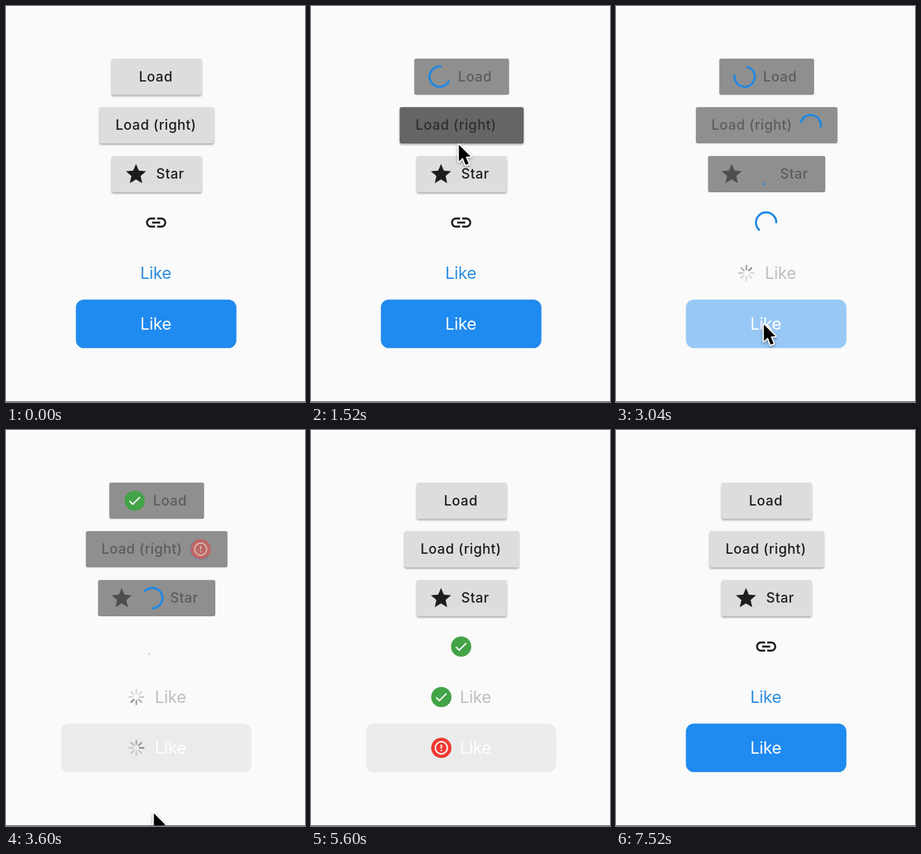
Write an HTML page with a canvas that moves like this. It is 460 px wide and 608 px high and loops after 7.56 s.

```html
<!DOCTYPE html>
<html lang="en">
<head>
<meta charset="utf-8">
<title>Progress buttons</title>
<style>
  html, body { margin: 0; width: 460px; height: 608px; overflow: hidden; background: #fafafa; }
  canvas { display: block; }
</style>
</head>
<body>
<canvas id="stage" width="460" height="608"></canvas>
<script>
const ctx = document.getElementById('stage').getContext('2d');
const LOOP = 7560, STEP = 40;
const DONE = 2060, REVERT = 3960; // ms after a click
const MID = 231.5, TAU = Math.PI * 2;
const BLUE = [31, 138, 240], SPIN_BLUE = '#1e88e5';

const ICON_SCALE = 1.55;
const STAR = new Path2D('M12 17.27L18.18 21l-1.64-7.03L22 9.24l-7.19-.61L12 2 9.19 8.63 2 9.24l5.46 4.73L5.82 21z');
const LINK = new Path2D('M3.9 12c0-1.71 1.39-3.1 3.1-3.1h4V7H7c-2.76 0-5 2.24-5 5s2.24 5 5 5h4v-1.9H7c-1.71 0-3.1-1.39-3.1-3.1zM8 13h8v-2H8v2zm9-6h-4v1.9h4c1.71 0 3.1 1.39 3.1 3.1s-1.39 3.1-3.1 3.1h-4V17h4c2.76 0 5-2.24 5-5s-2.24-5-5-5z');
const ARROW = new Path2D('M0 0V25.5L6 20L10.5 31L15 29L10.5 18.5L18 18Z');

const CURSOR_Y = [[400, -36], [760, 88], [1000, 137], [1520, 212], [2280, 356], [3040, 488], [3200, 490], [3700, 612]];

const lerp = (a, b, p) => a + (b - a) * p;
const clamp = v => Math.max(0, Math.min(1, v));
const rgb = c => `rgb(${c.map(Math.round).join(',')})`;
const mix = (a, b, p) => a.map((v, i) => lerp(v, b[i], p));
const grey = v => rgb([v, v, v]);

// Linear interpolation through [time, value] keys
function track(t, keys) {
  if (t <= keys[0][0]) return keys[0][1];
  for (let i = 1; i < keys.length; i++) {
    const [t0, v0] = keys[i - 1], [t1, v1] = keys[i];
    if (t < t1) return lerp(v0, v1, (t - t0) / (t1 - t0));
  }
  return keys[keys.length - 1][1];
}

// cubic-bezier(.4, 0, .2, 1)
function ease(x) {
  x = clamp(x);
  let lo = 0, hi = 1;
  for (let i = 0; i < 20; i++) {
    const u = (lo + hi) / 2, v = 1 - u;
    if (1.2 * v * v * u + 0.6 * v * u * u + u * u * u < x) lo = u; else hi = u;
  }
  return 3 * lo * lo - 2 * lo * lo * lo;
}

const expand = (t, end) => track(t, [[30, 0], [230, 1], [end, 1], [end + 200, 0]]);
const spinAlpha = t => track(t, [[150, 0], [300, 1], [DONE, 1], [DONE + 150, 0]]);
const statusAlpha = t => track(t, [[DONE + 50, 0], [DONE + 200, 1], [REVERT, 1], [REVERT + 120, 0]]);

function faded(alpha, draw) {
  if (alpha <= 0) return;
  ctx.save();
  ctx.globalAlpha *= alpha;
  draw();
  ctx.restore();
}

function box(x, y, w, h, r, fill) {
  ctx.fillStyle = fill;
  ctx.beginPath();
  ctx.roundRect(x, y, w, h, r);
  ctx.fill();
}

function disc(x, y, r, fill) {
  ctx.fillStyle = fill;
  ctx.beginPath();
  ctx.arc(x, y, r, 0, TAU);
  ctx.fill();
}

function label(text, x, y, color, font, spacing) {
  ctx.font = font + ' Inter, Roboto, sans-serif';
  ctx.letterSpacing = spacing;
  ctx.fillStyle = color;
  ctx.fillText(text, x, y);
}

function icon(path, x, y, color) {
  ctx.save();
  ctx.translate(x, y);
  ctx.scale(ICON_SCALE, ICON_SCALE);
  ctx.translate(-12, -12);
  ctx.fillStyle = color;
  ctx.fill(path);
  ctx.restore();
}

function ring(x, y, t) {
  const turn = t / 1333, phase = turn % 1;
  const head = ease(phase * 2), tail = ease(phase * 2 - 1);
  const start = Math.PI * (-0.5 + 1.5 * tail + 1.7 * phase - 0.8 * Math.floor(turn));
  const sweep = Math.max(1.5 * Math.PI * (head - tail), 0.05);
  ctx.strokeStyle = SPIN_BLUE;
  ctx.lineWidth = 3.2;
  ctx.beginPath();
  ctx.arc(x, y, 15.6, start, start + sweep);
  ctx.stroke();
}

function petals(x, y, t) {
  const active = Math.floor((t - 130) / 125);
  for (let i = 0; i < 8; i++) {
    const age = (((i - active) % 8) + 8) % 8;
    const alpha = (47 + 25 * Math.max(0, age - 3)) / 255;
    ctx.save();
    ctx.translate(x, y);
    ctx.rotate(i * TAU / 8);
    box(-1.25, -12.5, 2.5, 8.3, 1.25, `rgba(60,60,68,${alpha})`);
    ctx.restore();
  }
}

function status(x, y, ok) {
  disc(x, y, 15.6, ok ? '#43a347' : '#f03a30');
  ctx.strokeStyle = '#fff';
  ctx.lineWidth = 2.2;
  ctx.beginPath();
  if (ok) {
    ctx.moveTo(x - 8, y + 0.5);
    ctx.lineTo(x - 3, y + 5.5);
    ctx.lineTo(x + 8, y - 5.5);
    ctx.stroke();
  } else {
    ctx.arc(x, y, 9.3, 0, TAU);
    ctx.stroke();
    ctx.fillStyle = '#fff';
    ctx.fillRect(x - 1.1, y - 5, 2.2, 6);
    ctx.fillRect(x - 1.1, y + 2.8, 2.2, 2.2);
  }
}

function progress(b, t, spinner) {
  faded(spinAlpha(t), () => spinner(b.spinX, b.y, t));
  if (b.ok !== undefined) faded(statusAlpha(t), () => status(b.spinX, b.y, b.ok));
}

function raised(b, t) {
  const end = b.ok === undefined ? DONE : REVERT;
  const p = expand(t, end);
  const w = lerp(b.w[0], b.w[1], p);
  const tone = (...v) => track(t, [[-120, v[0]], [0, v[1]], [100, v[2]], [350, v[3]], [end, v[3]], [end + 200, v[0]]]);
  const lift = track(t, [[100, 1], [260, 0], [end, 0], [end + 200, 1]]);
  ctx.save();
  ctx.shadowColor = `rgba(0,0,0,${0.33 * lift})`;
  ctx.shadowBlur = 3;
  ctx.shadowOffsetY = 2;
  box(MID + 0.3 - w / 2, b.y - 27.8, w, 55.8, 3, grey(tone(221, 180, 101, 143)));
  ctx.restore();
  const ink = tone(29, 29, 46, 92);
  label(b.text, lerp(b.textX[0], b.textX[1], p), b.y + 7, grey(ink), '500 21px', '0.6px');
  if (b.starX) icon(STAR, lerp(b.starX[0], b.starX[1], p), b.y, grey(Math.min(ink, 78)));
  progress(b, t, ring);
}

function linkIcon(b, t) {
  const splash = track(t, [[-250, 0], [-80, 0.075], [60, 0.075], [300, 0]]);
  const radius = track(t, [[-250, 18], [0, 55]]);
  faded(splash, () => disc(232, b.y, radius, '#000'));
  const shown = track(t, [[60, 1], [200, 0], [REVERT + 50, 0], [REVERT + 200, 1]]);
  const ink = track(t, [[-60, 29], [40, 144], [REVERT, 144], [REVERT + 200, 29]]);
  faded(shown, () => icon(LINK, 231, b.y, grey(ink)));
  progress(b, t, ring);
}

function flat(b, t) {
  const p = expand(t, REVERT);
  const press = track(t, [[-120, 1], [-20, 0.45], [60, 0.45], [200, 1]]);
  const write = color => label(b.text, lerp(206.4, 229, p), b.y + 9.2, color, '400 25.5px', '-0.2px');
  if (b.filled) {
    const w = lerp(247, 293, p);
    faded(press, () => box(MID - 0.5 - w / 2, b.y - 37.3, w, 74.6, 12.5, rgb(mix(BLUE, [235, 235, 235], p))));
    write('#fff');
  } else {
    faded(press, () => write(rgb(mix([43, 141, 224], [190, 190, 190], p))));
  }
  progress(b, t, petals);
}

const BUTTONS = [
  { draw: raised, click: 1030, y: 108.5, text: 'Load', w: [138.5, 146], textX: [204.4, 226.2], spinX: 198, ok: true },
  { draw: raised, click: 1420, y: 183, text: 'Load (right)', w: [176, 218], textX: [168.4, 146.7], spinX: 299.5, ok: false },
  { draw: raised, click: 1870, y: 258, text: 'Star', w: [138.5, 180.5], textX: [231, 252.5], starX: [200, 178], spinX: 225 },
  { draw: linkIcon, click: 2240, y: 332.5, spinX: 231, ok: true },
  { draw: flat, click: 2640, y: 410, text: 'Like', spinX: 200.5, ok: true },
  { draw: flat, click: 3050, y: 488, text: 'Like', filled: true, spinX: 200.5, ok: false }
];

function cursor(t) {
  const y = track(t, CURSOR_Y);
  if (y < -35 || y > 608) return;
  ctx.save();
  ctx.translate(227.5, y + 1);
  ctx.lineJoin = 'round';
  ctx.lineWidth = 4;
  ctx.strokeStyle = '#fff';
  ctx.shadowColor = 'rgba(0,0,0,.35)';
  ctx.shadowBlur = 4;
  ctx.shadowOffsetY = 2;
  ctx.stroke(ARROW);
  ctx.shadowColor = 'transparent';
  ctx.fillStyle = '#000';
  ctx.fill(ARROW);
  ctx.restore();
}

function render(t) {
  ctx.fillStyle = '#fafafa';
  ctx.fillRect(0, 0, 460, 608);
  for (const b of BUTTONS) b.draw(b, t - b.click);
  cursor(t);
  ctx.fillStyle = '#4a4a4a';
  ctx.fillRect(0, 607, 460, 1);
}

const began = performance.now();
function tick() {
  const t = (performance.now() - began) % LOOP;
  render(Math.floor(t / STEP) * STEP);
  requestAnimationFrame(tick);
}
tick();
</script>
</body>
</html>
```
